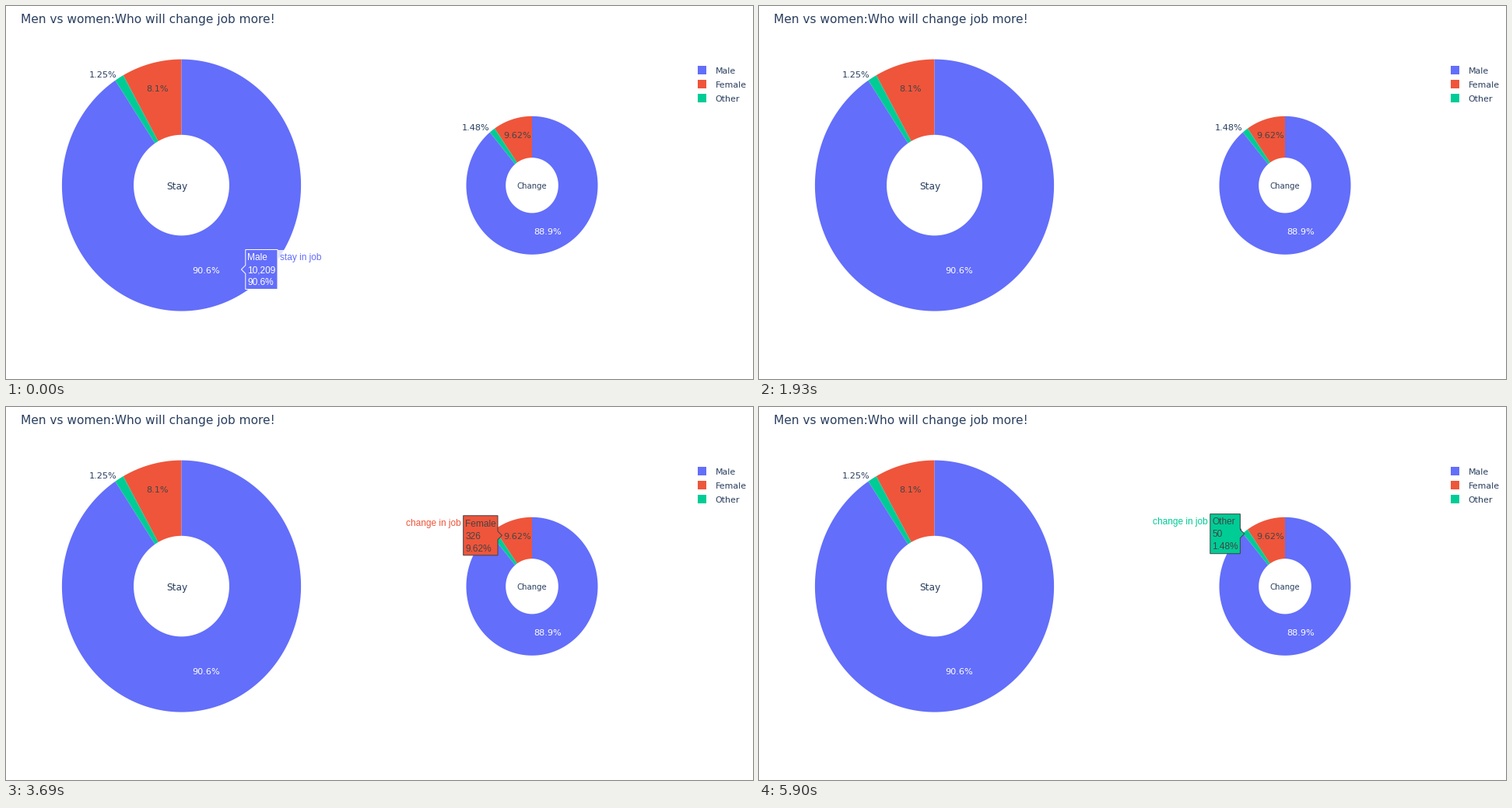
A matplotlib script for the animation above (5.96 s loop, 960 px wide and 480 px high).

```python
import numpy as np
import matplotlib.pyplot as plt
from matplotlib.animation import FuncAnimation
from matplotlib.patches import Polygon, Rectangle

W, H, DPI = 960, 480, 100
LOOP, STEP = 5960, 20
BLUE, RED, GREEN = "#636efa", "#ef553b", "#00cc96"
INK, DARK = "#2a3f5f", "#444444"
SANS, LABEL = "DejaVu Sans", "Liberation Sans"
TIP_SIZE = 11.85

fig = plt.figure(figsize=(W / DPI, H / DPI), dpi=DPI, facecolor="white")
ax = fig.add_axes([0, 0, 1, 1])
ax.set_xlim(0, W)
ax.set_ylim(H, 0)
ax.axis("off")


def text(x, y, s, px, color=INK, ha="left", font=SANS, z=3):
    return ax.text(x, y, s, fontsize=px * 72 / DPI, color=color, ha=ha,
                   va="baseline", family=font, zorder=z)


def ring_slice(cx, cy, rx, ry, start, end, color):
    """Slice of a ring; start and end are turns, counterclockwise from the top."""
    a = 2 * np.pi * np.linspace(start, end, 240)
    x, y = -np.sin(a), -np.cos(a)
    hole = 0.4
    xs = np.r_[cx + rx * x, cx + hole * rx * x[::-1]]
    ys = np.r_[cy + ry * y, cy + hole * ry * y[::-1]]
    ax.add_patch(Polygon(np.c_[xs, ys], fc=color, lw=0, zorder=2))


def donut(cx, cy, rx, ry, female, other, male):
    total = female + other + male
    a, b = female / total, (female + other) / total
    ring_slice(cx, cy, rx, ry, 0, a, RED)
    ring_slice(cx, cy, rx, ry, a, b, GREEN)
    ring_slice(cx, cy, rx, ry, b, 1, BLUE)


def tooltip(tip_x, tip_y, width, side, lines, name, color):
    """Hover label whose arrow points at the tip; side 1 is right, -1 left."""
    half, arrow = 25.5, 5.4
    near = tip_x + side * arrow
    far = near + side * width
    edge = "white" if color == BLUE else DARK
    shape = [(tip_x, tip_y), (near, tip_y + arrow), (near, tip_y + half),
             (far, tip_y + half), (far, tip_y - half), (near, tip_y - half),
             (near, tip_y - arrow)]
    back_w = 58 if name.startswith("stay") else 75
    back = Rectangle((min(far, far + side * back_w), tip_y - half), back_w, 18,
                     fc="white", alpha=0.8, lw=0, zorder=4)
    box = Polygon(shape, fc=color, ec=edge, lw=0.72, joinstyle="miter", zorder=5)
    parts = [ax.add_patch(back), ax.add_patch(box)]
    left = min(near, far) + 2.7
    for i, line in enumerate(lines):
        parts.append(text(left, tip_y + 4.2 + 16 * (i - 1), line, TIP_SIZE,
                          edge, font=LABEL, z=6))
    parts.append(text(far + side * 2.7, tip_y - 11.8, name, TIP_SIZE, color,
                      "left" if side > 0 else "right", LABEL, 6))
    return parts


text(18.6, 21.6, "Men vs women:Who will change job more!", 15.4)

donut(225.5, 230.6, 153.6, 162, 912, 141, 10209)
donut(676, 230.8, 84.5, 89, 326, 50, 3012)

text(220.2, 235.8, "Stay", 12.2, ha="center")
text(675.6, 235.1, "Change", 10.1, ha="center")

for x, y, s, color in [
    (124.5, 92.2, "1.25%", INK), (195, 110.1, "8.1%", DARK),
    (256.7, 344.1, "90.6%", "white"), (604, 160.2, "1.48%", INK),
    (657, 170.2, "9.62%", DARK), (696.2, 293.9, "88.9%", "white"),
]:
    text(x, y, s, 11.3, color, "center")

for i, (s, color) in enumerate([("Male", BLUE), ("Female", RED), ("Other", GREEN)]):
    y = 82.6 + 18 * i
    ax.add_patch(Rectangle((889, y - 5.6), 11.2, 11.2, fc=color, lw=0, zorder=2))
    text(911.8, y + 4.2, s, 11)

STAY, CHANGE = "stay in job", "change in job"

# (start ms, end ms, tooltip parts)
HOVERS = [
    (0, 380, tooltip(302.4, 339, 41.2, 1, ["Male", "10,209", "90.6%"], STAY, BLUE)),
    (380, 1020, tooltip(163.8, 105.3, 44.3, -1, ["Female", "912", "8.1%"], STAY, RED)),
    (1020, 1620, tooltip(142.8, 97.7, 38.6, -1, ["Other", "141", "1.25%"], STAY, GREEN)),
    (2240, 3140, tooltip(721.3, 289.2, 38.4, 1, ["Male", "3012", "88.9%"], CHANGE, BLUE)),
    (3140, 5120, tooltip(637.4, 165.3, 44.3, -1, ["Female", "326", "9.62%"], CHANGE, RED)),
    (5120, LOOP, tooltip(623.8, 163.2, 38.6, -1, ["Other", "50", "1.48%"], CHANGE, GREEN)),
]


def update(i):
    t = i * STEP
    for start, end, parts in HOVERS:
        for part in parts:
            part.set_visible(start <= t < end)
    return [part for _, _, parts in HOVERS for part in parts]


anim = FuncAnimation(fig, update, frames=LOOP // STEP, interval=STEP,
                     init_func=lambda: update(0), repeat=True, repeat_delay=0)
plt.show()
```
